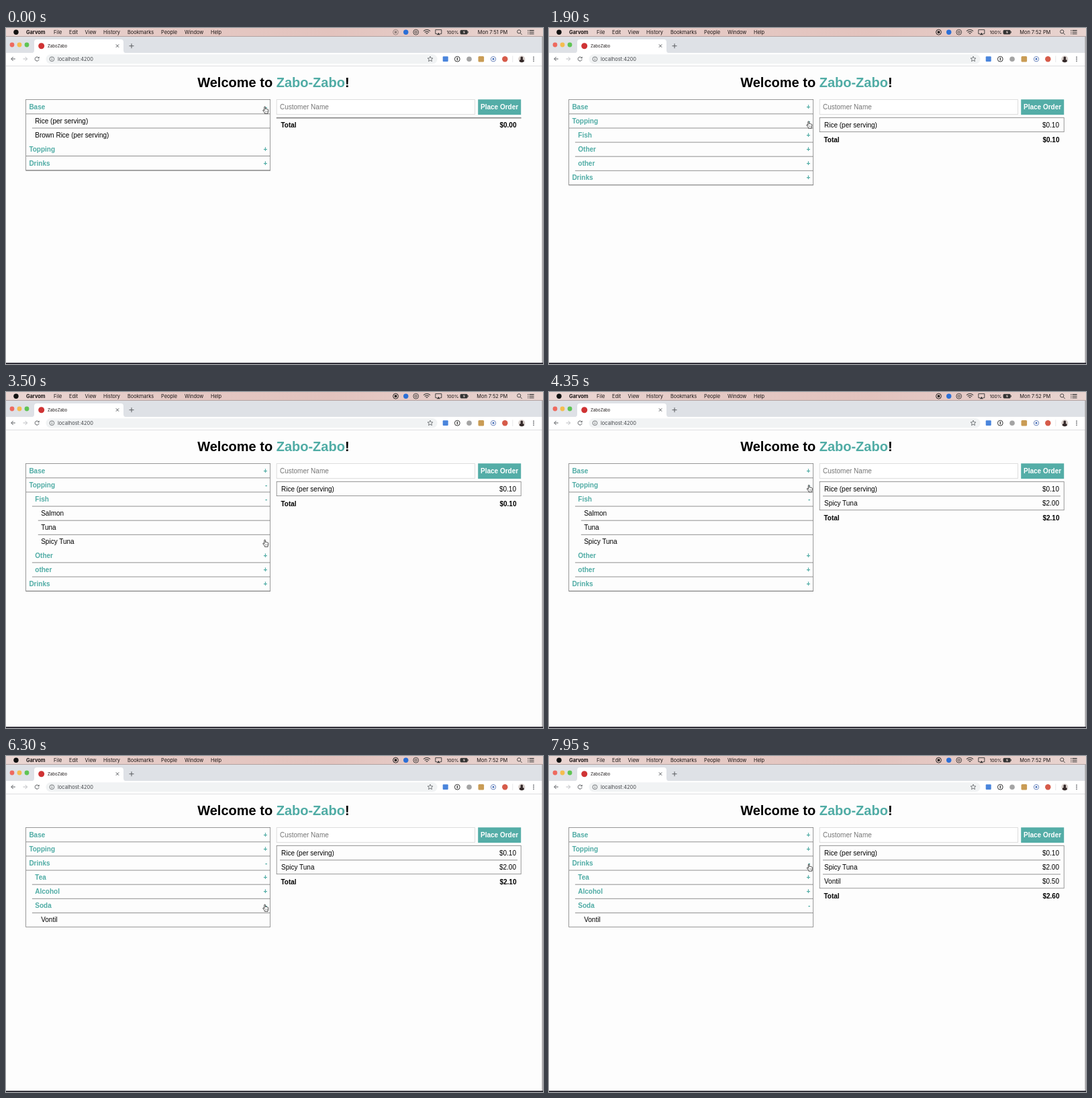
These frames come from a looping animation (800 px wide and 500 px high, 8000 ms). An HTML page:

```html
<!DOCTYPE html>
<html lang="en">
<head>
<meta charset="utf-8">
<title>Order form</title>
<style>
  html, body { margin: 0; width: 100%; height: 100%; overflow: hidden; background: #fdfdfd; }
  svg { display: block; width: 800px; height: 500px; }
  text { font-family: "Liberation Sans", Arial, sans-serif; font-size: 10px; white-space: pre; }
  .ui { font-family: Inter, Roboto, sans-serif; font-size: 7.4px; fill: #1b1515; }
  .b { font-weight: 700; }
  .teal { fill: #50aca5; }
  .end { text-anchor: end; }
  .line { fill: #757575; }
  .box { fill: none; stroke: #808080; stroke-width: .8; }
</style>
</head>
<body>
<svg id="stage" viewBox="0 0 800 500">
  <defs>
    <linearGradient id="bar">
      <stop offset="0" stop-color="#ead6d3"/>
      <stop offset=".3" stop-color="#e5c9c4"/>
      <stop offset=".6" stop-color="#e3c3be"/>
      <stop offset="1" stop-color="#e8d4d0"/>
    </linearGradient>
  </defs>
  <rect width="800" height="500" fill="#fdfdfd"/>

  <!-- menu bar -->
  <rect width="800" height="13" fill="url(#bar)"/>
  <circle cx="15" cy="6.2" r="3.7" fill="#111"/>
  <g id="menus"></g>
  <g id="rec" fill="none" stroke="#111" stroke-width=".9">
    <circle cx="580.5" cy="6.2" r="3.9"/>
    <rect x="578.8" y="4.5" width="3.4" height="3.4" fill="#111" stroke="none"/>
  </g>
  <circle cx="595.7" cy="6.2" r="3.7" fill="#2b6fd6"/>
  <g fill="none" stroke="#333" stroke-width=".9">
    <circle cx="610.7" cy="6.2" r="3.9"/>
    <circle cx="610.7" cy="6.2" r="1.6"/>
    <path d="M622 4.6q5-4.2 10 0M623.8 6.6q3.2-2.6 6.4 0M625.6 8.4q1.4-1 2.8 0" stroke-width="1.1"/>
    <path d="M642 8.6h-2.2v-6h9v6h-2.2"/>
    <path d="M641.5 10.3l2.8-3.4 2.8 3.4z" fill="#333" stroke="none"/>
    <rect x="677" y="3.4" width="10.2" height="5.6" rx="1" fill="#333"/>
    <path d="M688.3 5v2.4"/>
    <path d="M682.8 3.8l-2.2 2.8h1.8l-.6 2.2 2.4-3h-1.8z" fill="#ecd9d5" stroke="none"/>
    <circle cx="764.2" cy="5.4" r="2.6"/>
    <path d="M766.1 7.4l2.6 2.6"/>
    <path d="M777.2 3.6h1.2M779.6 3.6h7M777.2 6.2h1.2M779.6 6.2h7M777.2 8.8h1.2M779.6 8.8h7" stroke-width="1.1"/>
  </g>

  <!-- browser window -->
  <rect y="12.6" width="799" height="24.6" fill="#dee1e6"/>
  <rect y="12.2" width="800" height=".8" fill="#a89795"/>
  <path d="M38 37.2q4 0 4-4v-12.2q0-4 4-4h125q4 0 4 4v12.2q0 4 4 4z" fill="#fff"/>
  <rect y="37" width="799" height="19" fill="#fff"/>
  <rect y="56" width="799" height=".8" fill="#d8d9db"/>
  <circle cx="9" cy="25" r="3.4" fill="#ee6a5f"/>
  <circle cx="20" cy="25" r="3.4" fill="#f5bd4f"/>
  <circle cx="31" cy="25" r="3.4" fill="#5fc454"/>
  <circle cx="52.7" cy="26.7" r="4.5" fill="#cf3334"/>
  <text class="ui" x="62" y="29" style="font-size:6.1px">ZaboZabo</text>
  <rect x="59.5" y="39.3" width="583" height="14" rx="7" fill="#f1f3f4"/>
  <g fill="none" stroke="#5a5d61" stroke-width="1">
    <path d="M163.8 24.4l4.4 4.4m0-4.4l-4.4 4.4M187 23.2v7m-3.5-3.5h7"/>
    <path d="M13.8 46h-6m2.9-3l-3 3 3 3"/>
    <path d="M25.5 46h6m-2.9-3l3 3-3 3" stroke="#bbbdc0"/>
    <path d="M48.6 44.3a3 3 0 1 0 .5 2.5"/>
    <path d="M49.6 42.4v2.8h-2.8z" fill="#5a5d61" stroke="none"/>
    <circle cx="68.4" cy="46.2" r="3.4" stroke-width=".8"/>
    <path d="M68.4 45.7v2.4M68.4 44v.9" stroke-width=".8"/>
    <path d="M632 42.2l1.1 2.6 2.8.2-2.1 1.8.7 2.8-2.5-1.5-2.5 1.5.7-2.8-2.1-1.8 2.8-.2z" stroke-width=".8"/>
    <circle cx="672.3" cy="46.2" r="3.9" stroke="#333"/>
    <path d="M672.3 44.1v4.2" stroke="#333" stroke-width="1.3"/>
    <circle cx="726" cy="46.2" r="3.7" stroke="#6d87bd"/>
    <path d="M754.8 41.5v9.5" stroke="#d5d7da" stroke-width=".6"/>
  </g>
  <text class="ui" x="77" y="48.8" style="font-size:7.5px;fill:#45484c">localhost:4200</text>
  <rect x="650.7" y="42.3" width="8" height="7.8" rx="1" fill="#4a85dc"/>
  <circle cx="690" cy="46.2" r="3.8" fill="#a4a4a4"/>
  <rect x="703.5" y="42" width="8.6" height="8.6" rx="1.5" fill="#c99c55"/>
  <circle cx="726" cy="46.2" r="1.4" fill="#3c66b4"/>
  <circle cx="743.3" cy="46.2" r="4.2" fill="#d65b4a"/>
  <circle cx="768.3" cy="46.2" r="5" fill="#d8cfcb"/>
  <path d="M764.5 49.5q.5-2.6 2.4-2.8q-1.4-3.8 1.4-4.2q2.8.4 1.4 4.2q1.9.2 2.4 2.8a5 5 0 0 1-7.6 0z" fill="#352a2a"/>
  <g fill="#55585c">
    <circle cx="786" cy="43.3" r=".9"/><circle cx="786" cy="46.2" r=".9"/><circle cx="786" cy="49.1" r=".9"/>
  </g>
  <rect x="798.4" y="13" width="1.6" height="487" fill="#a5a3a6"/>
  <rect y="498.2" width="800" height="1.8" fill="#24222c"/>

  <!-- page -->
  <text class="b" x="398.4" y="88.4" text-anchor="middle" style="font-size:20px">Welcome to <tspan class="teal">Zabo-Zabo</tspan>!</text>
  <rect x="403.2" y="106.6" width="295.4" height="22" fill="#fff" stroke="#d6d6d6" stroke-width=".8"/>
  <text x="408" y="121.3" fill="#757575">Customer Name</text>
  <rect x="703.2" y="106.3" width="64" height="22.8" fill="#54ada7"/>
  <text class="b" x="707" y="121.3" fill="#fff">Place Order</text>
  <g id="menu"></g>
  <g id="order"></g>

  <g id="hand">
    <path d="M-2.2 1.2V-4.2q0-.9.8-.9t.8.9V-1.3q.2-.7.9-.6t.7.8q.3-.6.9-.4t.6.8q.4-.4.9-.1t.4.9V2q0 1.2-.7 2v1.3H-1.6V4.2L-4 1.2q-.5-.8.1-1.2t1.1.3z"
      fill="#fff" stroke="#222" stroke-width=".8" stroke-linejoin="round"/>
    <path d="M-.4 1.4v2M1 1.4v2M2.4 1.4v2" stroke="#555" stroke-width=".5"/>
  </g>
</svg>
<script>
const LOOP = 8000, LINE = 0.55, ROW = 20.55;
const $ = id => document.getElementById(id);

function add(parent, tag, attrs, label) {
  const el = document.createElementNS('http://www.w3.org/2000/svg', tag);
  for (const key in attrs) el.setAttribute(key, attrs[key]);
  if (label) el.textContent = label;
  parent.appendChild(el);
  return el;
}
const write = (parent, x, y, label, cls = '') => add(parent, 'text', { x, y, class: cls }, label);
const rule = (parent, x, y, width) => add(parent, 'rect', { x, y, width, height: 0.8, class: 'line' });

[[30, 'Garvom'], [71, 'File'], [94, 'Edit'], [117.5, 'View'], [145, 'History'], [181, 'Bookmarks'],
 [231, 'People'], [266, 'Window'], [305, 'Help']]
  .forEach(([x, label], i) => write($('menus'), x, 8.7, label, i ? 'ui' : 'ui b'));
write($('menus'), 656.5, 8.5, '100%', 'ui').style.fontSize = '6.8px';
const clock = write($('menus'), 747.3, 8.7, '', 'ui end');

const tree = [
  ['Base', ['Rice (per serving)', 'Brown Rice (per serving)']],
  ['Topping', [['Fish', ['Salmon', 'Tuna', 'Spicy Tuna']], ['Other', []], ['other', []]]],
  ['Drinks', [['Tea', []], ['Alcohol', []], ['Soda', ['Vontil']]]]
];
const items = [['Rice (per serving)', 0.1], ['Spicy Tuna', 2], ['Vontil', 0.5]];
const money = n => '$' + n.toFixed(2);

// start time, open groups, number of ordered items
const scenes = [
  [0, ['Base'], 0],
  [500, ['Base'], 1],
  [1350, [], 1],
  [1850, ['Topping'], 1],
  [2800, ['Topping', 'Fish'], 1],
  [3550, ['Topping', 'Fish'], 2],
  [4500, [], 2],
  [5100, ['Drinks'], 2],
  [6300, ['Drinks', 'Soda'], 2],
  [7150, ['Drinks', 'Soda'], 3]
];

// time, x, y of the pointer at each turn
const path = [
  [0, 387, 122], [100, 387, 122], [400, 387, 142], [600, 387, 142], [1000, 388, 122.5],
  [1350, 388, 122.5], [1700, 388, 143], [1850, 388, 143], [2250, 388, 164], [2800, 388, 164],
  [3350, 387, 225], [3650, 387, 225], [4200, 388.5, 143.5], [4500, 388.5, 143.5],
  [4850, 388.5, 163], [5600, 388.5, 163], [6100, 387, 226], [6350, 387, 226],
  [6750, 385.5, 246], [7200, 385.5, 246], [7750, 388.5, 166], [8000, 388.5, 166]
];

function drawMenu(open) {
  const g = $('menu');
  g.replaceChildren();
  let y = 106.9;
  const walk = (nodes, depth) => nodes.forEach((node, i) => {
    const leaf = typeof node === 'string';
    const [name, kids] = leaf ? [node, []] : node;
    const isOpen = open.includes(name);
    write(g, 34.4 + 8.9 * depth, y + 13.9, name, leaf ? '' : 'b teal');
    if (!leaf) write(g, 389.3, y + 13.9, isOpen ? '-' : '+', 'b teal end');
    y += ROW;
    if (!leaf || i < nodes.length - 1) {
      const x = 30 + 8.9 * depth;
      rule(g, x, y, 393.6 - x);
      y += LINE;
    }
    if (isOpen) walk(kids, depth + 1);
  });
  walk(tree, 0);
  add(g, 'rect', { x: 29.6, y: 106.5, width: 364, height: y - 106.2, class: 'box' });
}

function drawOrder(count) {
  const g = $('order');
  g.replaceChildren();
  let y = 134;
  const list = items.slice(0, count);
  list.forEach(([name, price], i) => {
    if (i) rule(g, 408, y - 0.6, 354);
    write(g, 410, y + 13.9, name);
    write(g, 760, y + 13.9, money(price), 'end');
    y += ROW + LINE;
  });
  add(g, 'rect', { x: 403.2, y: 133.5, width: 364, height: Math.max(0.6, y - 134), class: 'box' });
  write(g, 409.5, y + 14.4, 'Total', 'b');
  write(g, 760.5, y + 14.4, money(list.reduce((sum, item) => sum + item[1], 0)), 'b end');
}

let shown = -1;
function render(t) {
  const s = scenes.findLastIndex(scene => scene[0] <= t);
  if (s !== shown) {
    shown = s;
    drawMenu(scenes[s][1]);
    drawOrder(scenes[s][2]);
  }
  const late = t >= 450;
  clock.textContent = late ? 'Mon 7:52 PM' : 'Mon 7:51 PM';
  $('rec').setAttribute('opacity', late ? 1 : 0.4);

  const k = Math.max(1, path.findIndex(p => p[0] > t));
  const [t0, x0, y0] = path[k - 1], [t1, x1, y1] = path[k];
  const u = (t - t0) / (t1 - t0), e = u * u * (3 - 2 * u);
  $('hand').setAttribute('transform', `translate(${x0 + (x1 - x0) * e} ${y0 + (y1 - y0) * e})`);
}

const start = performance.now();
function tick() {
  render((performance.now() - start) % LOOP);
  requestAnimationFrame(tick);
}
tick();
</script>
</body>
</html>
```
